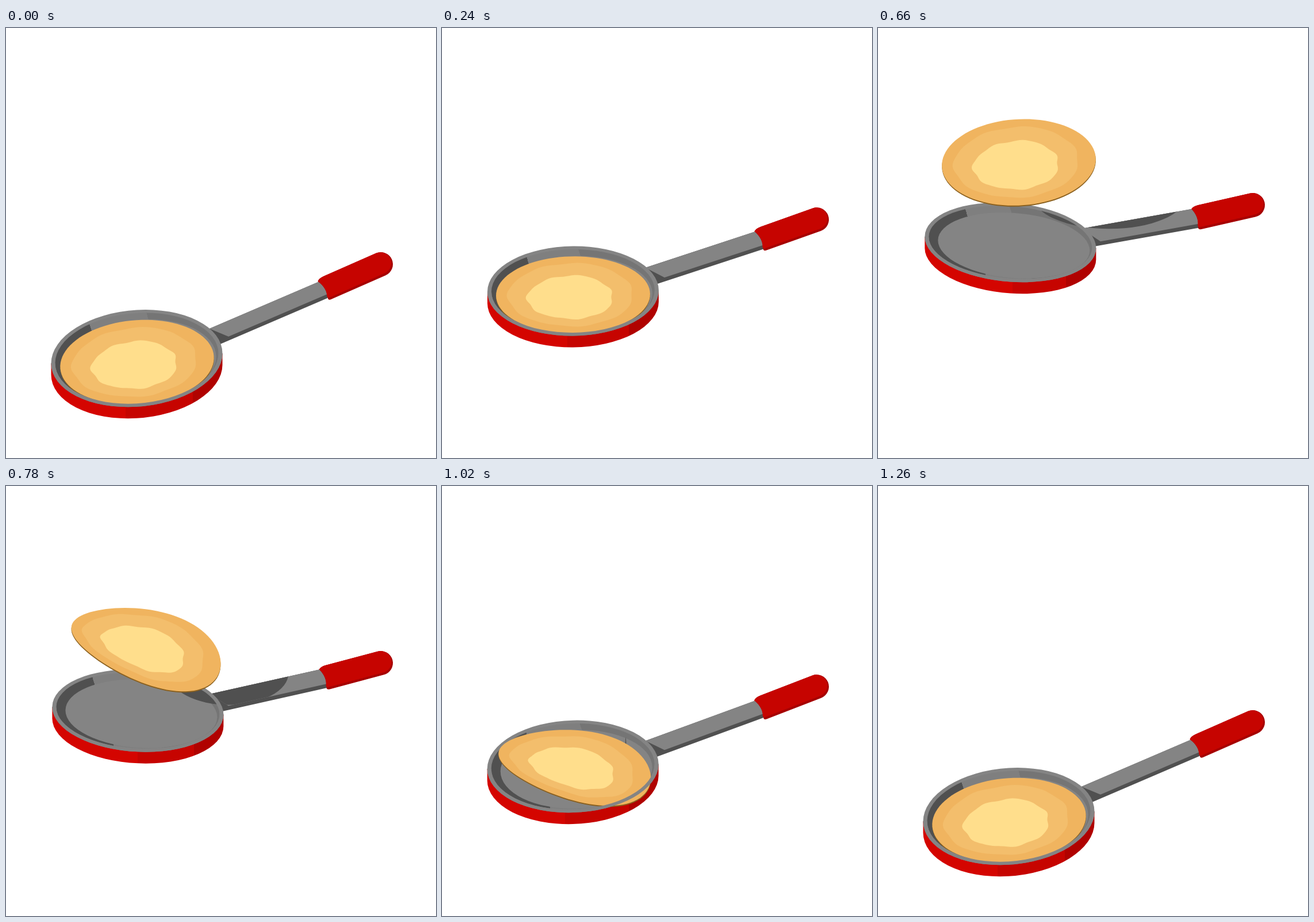
Write an HTML page with a canvas that moves like this. It is 748 by 748 pixels and loops after 1.29 s.

```html
<!DOCTYPE html>
<html>
<head>
<meta charset="utf-8">
<title>Pancake flip</title>
<style>
html, body { margin: 0; height: 100%; overflow: hidden; background: #fff; }
canvas { display: block; }
</style>
</head>
<body>
<canvas id="stage" width="748" height="748"></canvas>
<script>
const ctx = document.getElementById('stage').getContext('2d');
const LOOP = 1290, STEP = 30, TAU = Math.PI * 2;
const GREY = '#848484', DARK = '#505050';

const progress = (t, from, to) => Math.min(1, Math.max(0, (t - from) / (to - from)));
const ease = (t, from, to) => { const x = progress(t, from, to); return x * x * (3 - 2 * x); };
const pulse = (t, from, to) => Math.sin(Math.PI * progress(t, from, to));
const mix = (a, b, k) => a + (b - a) * k;

// Closed outline in disc coordinates, slightly wavy
const blob = (x, y, rx, ry, wave = 0) => Array.from({ length: 90 }, (_, i) => {
  const p = i / 90 * TAU;
  const r = 1 + wave * (Math.sin(3 * p - 1) + Math.sin(7 * p + 4) + .7 * Math.sin(11 * p + 5));
  return [x + rx * r * Math.cos(p), y + ry * r * Math.sin(p)];
});
const edge = blob(0, 0, 1, 1);
const ring = blob(-.03, 0, .81, .82, .012);
const spot = blob(-.035, .065, .555, .565, .02);

// The hand raises the handle end and levels the pan, then lowers both
function panPose(t) {
  const lift = (.84 * ease(t, 0, 300) + .16 * ease(t, 210, 630)) * (1 - ease(t, 860, 1230));
  const level = ease(t, 70, 470) * (1 - ease(t, 600, 1220));
  const slope = .44 - .218 * level, cap = 411 - 103 * lift;
  return {
    cap,
    grip: cap + 100 * slope,
    root: cap + 320 * slope - 17,
    x: 227.5 + 3 * level * level,
    y: cap + 465 * slope - 41,
    depth: 52 + 73 * slope,
    tilt: 30 - 88 * slope,
    seam: 110 * slope - 29
  };
}

// Half a turn in the air: one end leaves the pan last and lands last
function cakePose(t, pan) {
  const curl = pulse(t, 290, 550) ** 2, sag = pulse(t, 720, 1080);
  const rest = pan.y + 6.75, flight = 225 + .00135 * (t - 580) ** 2;
  const angle = 1.4 * pan.tilt / 149 + Math.PI * ease(t, 270, 720);
  const axis = angle + .375 * sag, length = 134 + 6 * curl;
  const face = 1 - 2 * ease(t, 250, 490);
  const width = (pan.depth - 11) * face * (1 + .3 * pulse(t, 450, 870)) * (1 - .42 * sag * sag);
  return {
    x: 228 + 17 * pulse(t, 300, 1060) + 27 * curl,
    y: mix(rest, Math.min(rest, flight), ease(t, 270, 430)),
    ax: length * Math.cos(axis), ay: length * Math.sin(axis),
    bx: -width * Math.sin(angle), by: width * Math.cos(angle),
    bend: 13 * curl,
    bunch: .3 * curl,
    taper: -.95 * curl - .9 * sag * sag
  };
}

function shadowPose(cake, pan) {
  const height = Math.max(0, pan.y - cake.y);
  return {
    x: cake.x + 88 + .5 * height,
    y: cake.y + .42 * height,
    rx: Math.abs(cake.ax) * height / 140,
    ry: .76 * Math.hypot(cake.ay, cake.by)
  };
}

function polygon(points) {
  ctx.beginPath();
  points.forEach(p => ctx.lineTo(...p));
  ctx.closePath();
}

function fill(style) {
  ctx.fillStyle = style;
  ctx.fill();
}

// Darkens the part of the current path under the pancake's shadow
function shade({ x, y, rx, ry }) {
  ctx.save();
  ctx.clip();
  ctx.beginPath();
  ctx.ellipse(x, y, rx, ry, 0, 0, TAU);
  fill(DARK);
  ctx.restore();
}

function drawHandle({ cap, grip, root }, shadow) {
  const mid = x => mix(root, grip, (x - 366) / 186);
  const top = x => [x, mid(x) - 17], low = (x, d) => [x, mid(x) + 18 - d];
  polygon([top(345), top(552), low(560, 0), low(345, 0)]);
  fill(DARK);
  polygon([top(354), top(552), low(560, 7), low(387, 7)]);
  fill(GREY);
  shade(shadow);

  const length = Math.hypot(100, cap - grip);
  ctx.save();
  ctx.translate(652, cap);
  ctx.rotate(Math.atan2(cap - grip, 100));
  const sleeve = (r, y) => {
    ctx.beginPath();
    ctx.moveTo(-length - 3, y - r + 4);
    ctx.quadraticCurveTo(-length + 1, y - r, -length + 10, y - r);
    ctx.arc(0, y, r, -Math.PI / 2, Math.PI / 2);
    ctx.lineTo(-length + 6, y + r);
    ctx.quadraticCurveTo(-length + 1, y + r, -length + 1, y + r - 3);
    ctx.quadraticCurveTo(-length + 7, y, -length - 3, y - r + 4);
  };
  sleeve(21, 0);
  fill('#a60000');
  sleeve(19, -2);
  fill('#c60400');
  ctx.restore();
}

function inPanPlane({ x, y, tilt }, paint) {
  ctx.save();
  ctx.transform(1, tilt / 149, 0, 1, x, y);
  paint();
  ctx.restore();
}

function bands(x, y, ...parts) {
  const gradient = ctx.createLinearGradient(-x, -y, x, y);
  let from = 0;
  for (const [to, color] of parts) {
    gradient.addColorStop(from, color);
    gradient.addColorStop(to, color);
    from = to;
  }
  return gradient;
}

function drawPan(pan, shadow) {
  const { depth, seam } = pan;
  inPanPlane(pan, () => {
    const oval = (x, y, rx, ry) => { ctx.beginPath(); ctx.ellipse(x, y, rx, ry, 0, 0, TAU); };
    ctx.beginPath();
    ctx.ellipse(0, 20, 149, depth, 0, 0, Math.PI);
    ctx.lineTo(-149, 0);
    ctx.lineTo(149, 0);
    fill(bands(149, 0, [(149 - seam) / 298, '#d40500'], [.826, '#c60400'], [1, '#b00200']));
    oval(0, 0, 149, depth);
    fill(GREY);
    oval(0, 0, 142, depth - 5.5);
    fill(bands(143, -45, [.303, DARK], [(171 + .95 * seam) / 300, '#7f7f7f'], [1, '#757575']));
    oval(6, 5, 132, depth - 12);
    fill(GREY);
    oval(0, 0, 142, depth - 5.5);
  });
  shade(shadow);
}

function drawFrontRim(pan) {
  inPanPlane(pan, () => {
    ctx.beginPath();
    ctx.ellipse(0, 0, 149, pan.depth, 0, 0, Math.PI);
    ctx.ellipse(0, 0, 142, pan.depth - 5.5, 0, Math.PI, 0, true);
    fill(GREY);
  });
}

function drawCake({ x, y, ax, ay, bx, by, bend, bunch, taper }) {
  const side = Math.sign(ax * by - ay * bx) || 1;
  const thickness = 2 / Math.max(2, Math.hypot(bx, by));
  const layer = (points, color, shift = 0) => {
    polygon(points.map(([u, v]) => {
      const s = u * side, along = mix(s, s ** 3, bunch);
      const across = v * (1 + taper * s) + shift, bow = bend * (s * s - 1);
      return [x + ax * along + bx * across + bow, y + ay * along + by * across + bow];
    }));
    fill(color);
  };
  layer(edge, '#8a601f', thickness);
  layer(edge, '#f0b45f');
  layer(ring, '#f3be6c');
  layer(spot, '#ffde8c');
}

function draw(now) {
  const t = Math.floor(now % LOOP / STEP) * STEP;
  const pan = panPose(t), cake = cakePose(t, pan), shadow = shadowPose(cake, pan);
  ctx.fillStyle = '#fff';
  ctx.fillRect(0, 0, 748, 748);
  drawHandle(pan, shadow);
  drawPan(pan, shadow);
  drawCake(cake);
  drawFrontRim(pan);
}

const start = performance.now();
function tick() {
  draw(performance.now() - start);
  requestAnimationFrame(tick);
}
tick();
</script>
</body>
</html>
```
